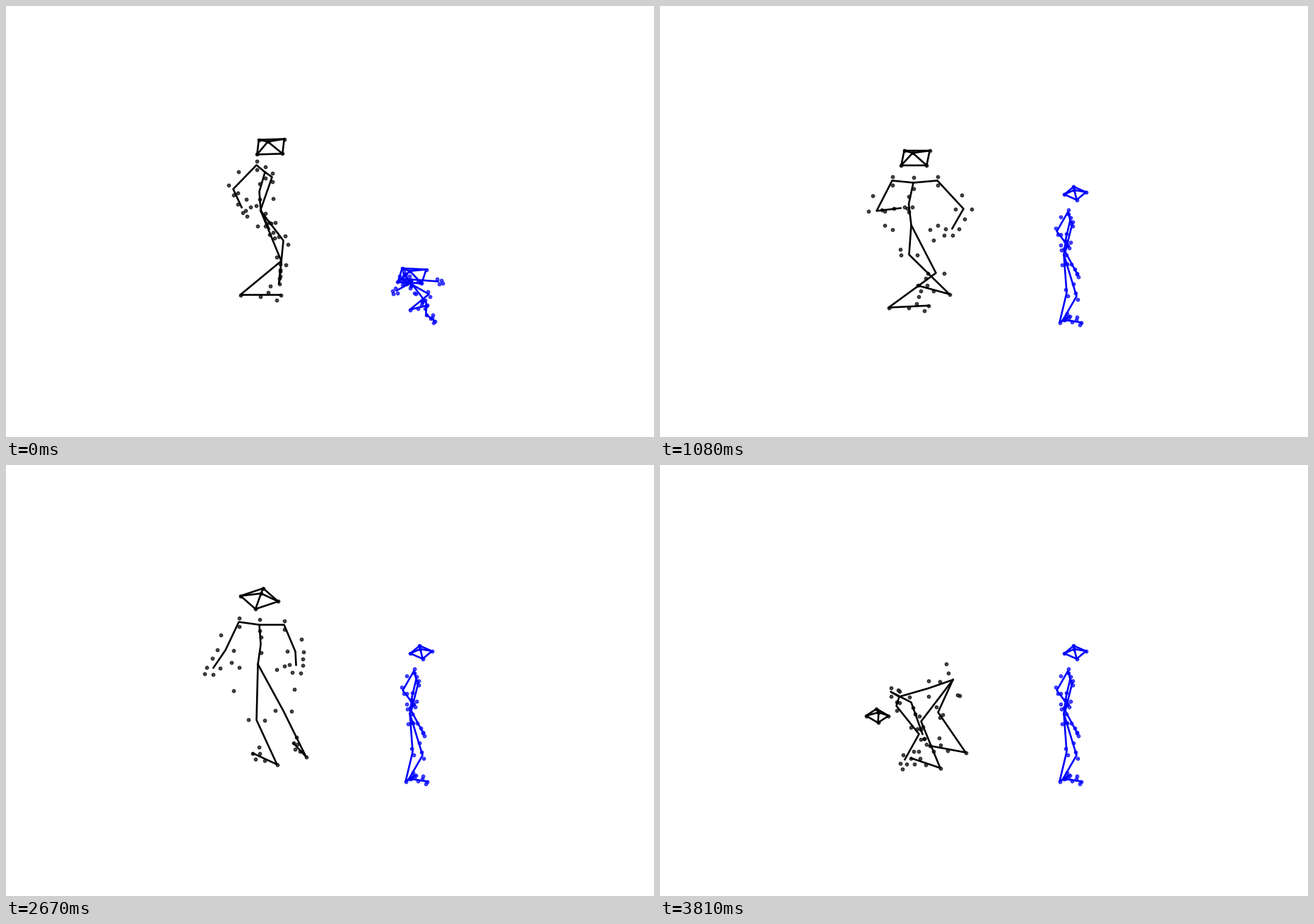
A matplotlib script for the animation above (3.84 s loop, 917 by 611 pixels).

```python
import numpy as np
import matplotlib.pyplot as plt
from matplotlib.animation import FuncAnimation
from matplotlib.collections import LineCollection

W, H, DPI = 917, 611, 64
STEP, FRAMES = 30, 128
PT = 72 / DPI  # points per pixel
DOWN = np.array([0.0, 1.0])


def hermite(times, values, t):
    """Smooth interpolation that does not overshoot its keys."""
    x, v = np.array(times, float), np.array(values, float)
    t = min(max(t, x[0]), x[-1])
    d = np.diff(v, axis=0) / np.diff(x).reshape(-1, *[1] * (v.ndim - 1))
    m = np.zeros_like(v)
    prod, total = d[:-1] * d[1:], d[:-1] + d[1:]
    m[1:-1] = np.where(prod > 0, 2 * prod / np.where(total == 0, 1, total), 0)
    i = min(np.searchsorted(x, t, side="right") - 1, len(x) - 2)
    h = x[i + 1] - x[i]
    s = (t - x[i]) / h
    return ((1 + 2 * s) * (1 - s) ** 2 * v[i] + s * (1 - s) ** 2 * h * m[i]
            + s * s * (3 - 2 * s) * v[i + 1] + s * s * (s - 1) * h * m[i + 1])


def pair(p, offset):
    return [p - offset, p + offset]


class Figure:
    """Stick figure whose toes, head and markers follow from a few joints."""

    def __init__(self, scale):
        self.scale = scale
        self.keys = {}

    def key(self, time, **parts):
        for name, value in parts.items():
            self.keys.setdefault(name, []).append((time, value))

    def part(self, name, t):
        keys = sorted(self.keys[name], key=lambda k: k[0])
        return hermite(*zip(*keys), t)

    def foot(self, heading):
        a = np.radians(heading)
        return self.scale * np.array([57 * np.cos(a), -20 * np.sin(a)])

    def head(self, t, facing):
        x, y, yaw, size = self.part("head", t)
        a, c = np.radians(yaw), np.array([x, y])
        right = size / 2 * np.array([np.cos(a), -0.58 * np.sin(a)])
        back = size / 2 * np.array([0.12 * facing - np.sin(a), -0.58 * np.cos(a)])
        ring = [c - right + back, c + right + back,
                c + right - back, c - right - back]
        return ring, c - size * np.array([0.11 * facing, 0.2])

    def sample(self, t):
        """Return the lines, and all dots, at time t."""
        k = self.scale
        hip, neck = self.part("spine", t)
        arms = [self.part(n, t) for n in ("arm_a", "arm_b")]
        legs = [self.part(n, t) for n in ("leg_a", "leg_b")]
        headings = self.part("feet", t)
        feet = [self.foot(a) for a in headings]
        facing = np.cos(np.radians(headings[0]))
        mid = (hip + neck) / 2 - [5 * k * facing, 0]

        # The shoulder line sets the direction and width of marker pairs
        span = arms[1][0] - arms[0][0]
        width = np.hypot(*span) + 1e-6
        axis = span / width
        joint = axis * (6 * k + 0.09 * width)
        outer = axis * (18 * k + 0.3 * width)

        dots = pair(neck, 8 * k * DOWN) + pair(mid, 11 * k * DOWN)
        dots += pair(hip, outer) + pair(hip + 6 * k * DOWN, outer * 0.7)
        lines = [[hip, mid, neck]]
        for side, (shoulder, elbow, wrist) in zip((-1, 1), arms):
            fore = wrist - elbow
            tip = wrist + 11 * k * fore / (np.hypot(*fore) + 1e-6)
            dots += pair(shoulder, 6 * k * DOWN) + pair(elbow, joint)
            dots += pair(wrist, joint * 0.85) + pair(tip, joint * 0.5)
            dots += [(shoulder + elbow) / 2 + side * joint * 1.4,
                     (elbow + wrist) / 2 + side * joint * 0.85]
            lines.append([neck, shoulder, elbow, wrist])
        for side, (knee, heel), foot in zip((-1, 1), legs, feet):
            toe = heel + foot
            dots += pair(knee, joint) + [(hip + knee) / 2 + side * outer * 0.9]
            dots += [toe - back * foot + k * drop * DOWN for back, drop
                     in ((0.3, -4), (0.1, 7), (0.5, 2), (0.25, -13))]
            dots += [heel, toe]
            lines.append([hip, knee, heel, toe])

        ring, top = self.head(t, facing)
        lines += [ring + ring[:1], [ring[0], top, ring[2]], [ring[1], top, ring[3]]]
        return [np.array(p) for p in lines], np.array(dots + ring + [top])


black = Figure(1)
black.key(0, spine=[(360, 290), (366, 235)], feet=(0, 88),
          arm_a=[(354, 225), (321, 259), (333, 285)],
          arm_b=[(376, 242), (360, 288), (372, 316)],
          leg_a=[(389, 361), (331, 409)], leg_b=[(392, 332), (386, 393)],
          head=(374, 199, 3, 36))
black.key(720, spine=[(326, 306), (376, 251)], feet=(2, 122),
          arm_a=[(367, 235), (349, 213), (362, 185)],
          arm_b=[(395, 262), (389, 311), (381, 331)],
          leg_a=[(381, 378), (312, 425)], leg_b=[(376, 373), (397, 407)],
          head=(392, 218, 1, 36))
black.key(1080, spine=[(355, 310), (358, 250)], feet=(8, 142),
          arm_a=[(328, 247), (306, 290), (340, 286)],
          arm_b=[(392, 247), (429, 287), (413, 315)],
          leg_a=[(390, 378), (323, 427)], leg_b=[(352, 352), (409, 408)],
          head=(361, 215, 0, 36))
black.key(2010, spine=[(355, 275), (374, 221)], feet=(24, 121),
          arm_a=[(352, 210), (288, 201), (235, 185)],
          arm_b=[(393, 224), (461, 222), (484, 220)],
          leg_a=[(353, 365), (319, 425)], leg_b=[(363, 351), (397, 403)],
          head=(386, 188, 2, 37))
black.key(2670, spine=[(356, 282), (358, 226)], feet=(127, 108),
          arm_a=[(329, 222), (310, 262), (293, 287)],
          arm_b=[(393, 226), (409, 264), (410, 283)],
          leg_a=[(354, 361), (383, 424)], leg_b=[(392, 348), (424, 413)],
          head=(358, 189, 30, 37))
black.key(3150, spine=[(373, 276), (354, 229)], feet=(133, 147),
          arm_a=[(341, 243), (347, 286), (323, 323)],
          arm_b=[(370, 211), (393, 238), (386, 265)],
          leg_a=[(363, 363), (387, 427)], leg_b=[(395, 348), (423, 405)],
          head=(336, 217, 0, 33))
black.key(3810, spine=[(414, 304), (338, 328)], feet=(136, 152),
          arm_a=[(334, 341), (366, 381), (346, 417)],
          arm_b=[(326, 321), (355, 336), (371, 381)],
          leg_a=[(369, 363), (396, 429)], leg_b=[(393, 350), (432, 407)],
          head=(307, 355, -45, 24))

# Arm swings between the full poses
black.key(900, arm_a=[(345, 240), (296, 246), (246, 238)])
black.key(1680, arm_a=[(338, 225), (333, 182), (325, 148)],
          arm_b=[(393, 232), (424, 186), (421, 150)])
black.key(1860, arm_b=[(393, 227), (462, 207), (496, 198)])
black.key(2100, arm_a=[(348, 212), (277, 206), (213, 192)])

blue = Figure(0.5)
blue.key(0, spine=[(575, 395), (572, 392)], feet=(35, -65),
         arm_a=[(562, 378), (572, 392), (552, 403)],
         arm_b=[(566, 390), (558, 386), (611, 390)],
         leg_a=[(598, 408), (571, 430)], leg_b=[(594, 420), (594, 437)],
         head=(574, 382, -5, 34))
blue.key(570, spine=[(571, 352), (580, 303)], feet=(60, -25),
         arm_a=[(577, 291), (561, 319), (574, 336)],
         arm_b=[(583, 308), (573, 348), (588, 376)],
         leg_a=[(575, 406), (565, 448)], leg_b=[(589, 411), (570, 444)],
         head=(587, 265, 55, 23))

fig = plt.figure(figsize=(W / DPI, H / DPI), dpi=DPI, facecolor="white")
ax = fig.add_axes([0, 0, 1, 1])
ax.set_xlim(-0.5, W - 0.5)
ax.set_ylim(H - 0.5, -0.5)
ax.axis("off")


def artists(color):
    lines = LineCollection([], colors=color, linewidths=2.6 * PT,
                           capstyle="projecting", joinstyle="round", zorder=1)
    ax.add_collection(lines)
    dots = ax.scatter([], [], s=(4.4 * PT) ** 2, c=color, alpha=0.7,
                      linewidths=1.4 * PT, zorder=2)
    return lines, dots


cast = [(black, *artists("black")), (blue, *artists("blue"))]


def draw(i):
    for figure, lines, dots in cast:
        segments, points = figure.sample(i * STEP)
        lines.set_segments(segments)
        dots.set_offsets(points)
    return [a for _, *both in cast for a in both]


anim = FuncAnimation(fig, draw, frames=FRAMES, interval=STEP,
                     repeat=True, repeat_delay=0, blit=False)
plt.show()
```
